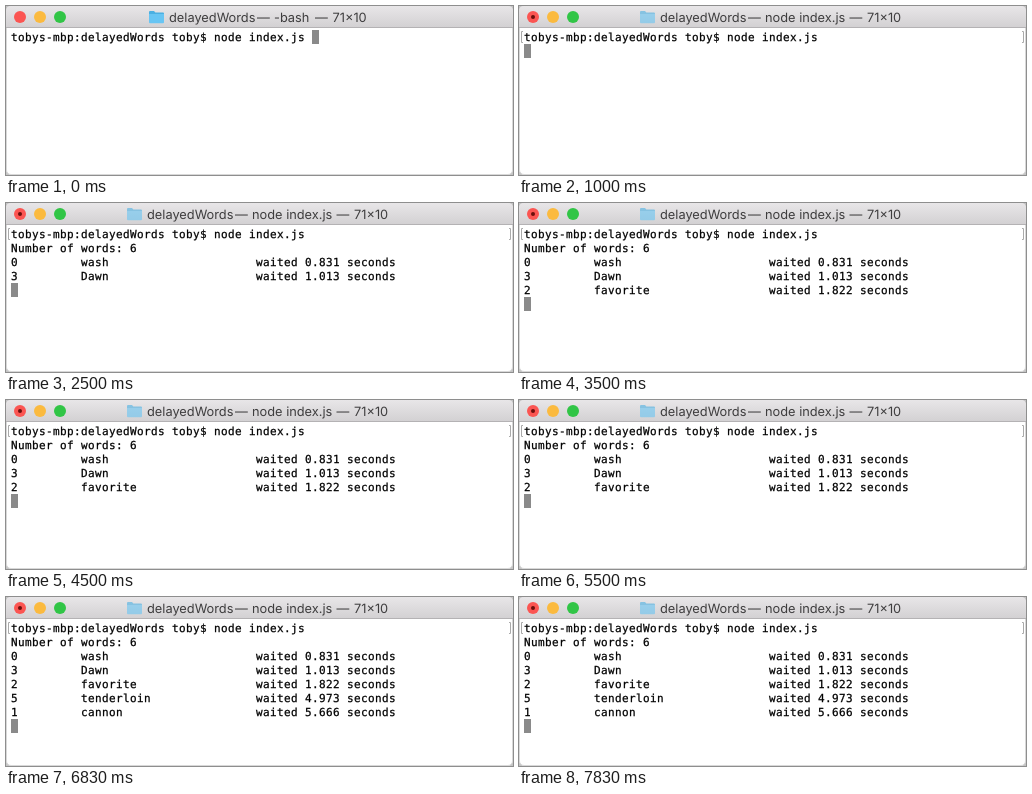
An HTML page that plays this animation: 507x169 px, repeating every 8 s.

```html
<!DOCTYPE html>
<html lang="en">
<head>
<meta charset="utf-8">
<title>delayedWords</title>
<style>
  html, body { margin: 0; width: 100%; height: 100%; overflow: hidden; background: #fff; }
  svg { display: block; width: 100%; height: 100%; }
  text { white-space: pre; text-rendering: geometricPrecision; }
  .term text {
    font: 11px "DejaVu Sans Mono", monospace; letter-spacing: .378px;
    fill: #000; stroke: #000; stroke-width: .25;
  }
  .title { font: 12.8px Inter, sans-serif; fill: #3e3d3e; }
  .brackets { fill: none; stroke: #aaa; }
</style>
</head>
<body>
<svg viewBox="0 0 507 169">
  <defs>
    <linearGradient id="bar" x2="0" y2="1">
      <stop stop-color="#e8e6e8"/>
      <stop offset="1" stop-color="#d2d0d2"/>
    </linearGradient>
  </defs>
  <rect width="507" height="169" fill="#c4c4c4"/>
  <rect x=".5" y=".5" width="506" height="168" rx="4.5" fill="#fff" stroke="#d8d8d8"/>
  <path d="M0 22V5Q0 0 5 0H502Q507 0 507 5V22Z" fill="url(#bar)"/>
  <path d="M0 21.5H507" stroke="#b4b2b4"/>
  <circle cx="14" cy="11" r="6" fill="#fb5552"/>
  <circle cx="34" cy="11" r="6" fill="#fbba3f"/>
  <circle cx="54" cy="11" r="6" fill="#31c546"/>
  <circle id="dot" cx="14" cy="11" r="2" fill="#6a0f0c"/>
  <g id="folder">
    <path d="M0 11V1Q0 0 1 0H5L6.4 1.4H14Q15 1.4 15 2.4V11Z" fill="#4bb0e2"/>
    <path d="M0 3H15V11.2Q15 12.2 14 12.2H1Q0 12.2 0 11.2Z" fill="#68c5f3"/>
  </g>
  <text class="title" y="16"><tspan>delayedWords</tspan><tspan>—</tspan><tspan id="job"></tspan><tspan>—</tspan><tspan>71×10</tspan></text>
  <path id="brackets" class="brackets" d="M4 25.5H2.5V36.5H4M503 25.5H504.5V36.5H503"/>
  <g class="term">
    <rect id="cursor" width="7" height="14" fill="#8a8a8a"/>
    <g id="lines"></g>
  </g>
</svg>
<script>
  const LOOP = 8000, ENTER = 830, RUN = 990, START = 1080;
  const CELL = 7, ROW = 14;
  const $ = id => document.getElementById(id);

  const prompt = "tobys-mbp:delayedWords toby$ node index.js ";
  const words = [
    [0, "wash", 0.831],
    [3, "Dawn", 1.013],
    [2, "favorite", 1.822],
    [5, "tenderloin", 4.973],
    [1, "cannon", 5.666]
  ];
  const output = [
    { at: 0, text: prompt },
    { at: START, text: "Number of words: 6" },
    ...words.map(([i, word, wait]) => ({
      at: START + wait * 1000,
      text: String(i).padEnd(10) + word.padEnd(25) + `waited ${wait.toFixed(3)} seconds`
    }))
  ];

  const lines = output.map(({ text }, row) => {
    const el = document.createElementNS("http://www.w3.org/2000/svg", "text");
    el.setAttribute("x", 5);
    el.setAttribute("y", 35 + row * ROW);
    el.textContent = text;
    return $("lines").appendChild(el);
  });
  const parts = document.querySelectorAll(".title tspan");

  const show = (el, on) => el.setAttribute("visibility", on ? "visible" : "hidden");

  function setTitle(running) {
    const left = running ? 121 : 143;
    const shift = running ? 43.5 : 0;
    const offsets = [20, 108, 125, 166 + shift, 183.5 + shift];
    parts.forEach((part, i) => part.setAttribute("x", left + offsets[i]));
    $("job").textContent = running ? "node index.js" : "-bash";
    $("folder").setAttribute("transform", `translate(${left} 5)`);
    $("folder").setAttribute("opacity", running ? 0.6 : 1);
    show($("dot"), running);
  }

  function draw(t) {
    const entered = t >= ENTER;
    const count = output.filter(line => t >= line.at).length;
    lines.forEach((el, i) => show(el, i < count));
    show($("brackets"), entered);
    setTitle(t >= RUN);
    $("cursor").setAttribute("x", 5 + (entered ? 0 : prompt.length * CELL));
    $("cursor").setAttribute("y", 24 + (entered ? count * ROW : 0));
  }

  const begin = performance.now();
  function tick() {
    draw((performance.now() - begin) % LOOP);
    requestAnimationFrame(tick);
  }
  tick();
</script>
</body>
</html>
```
